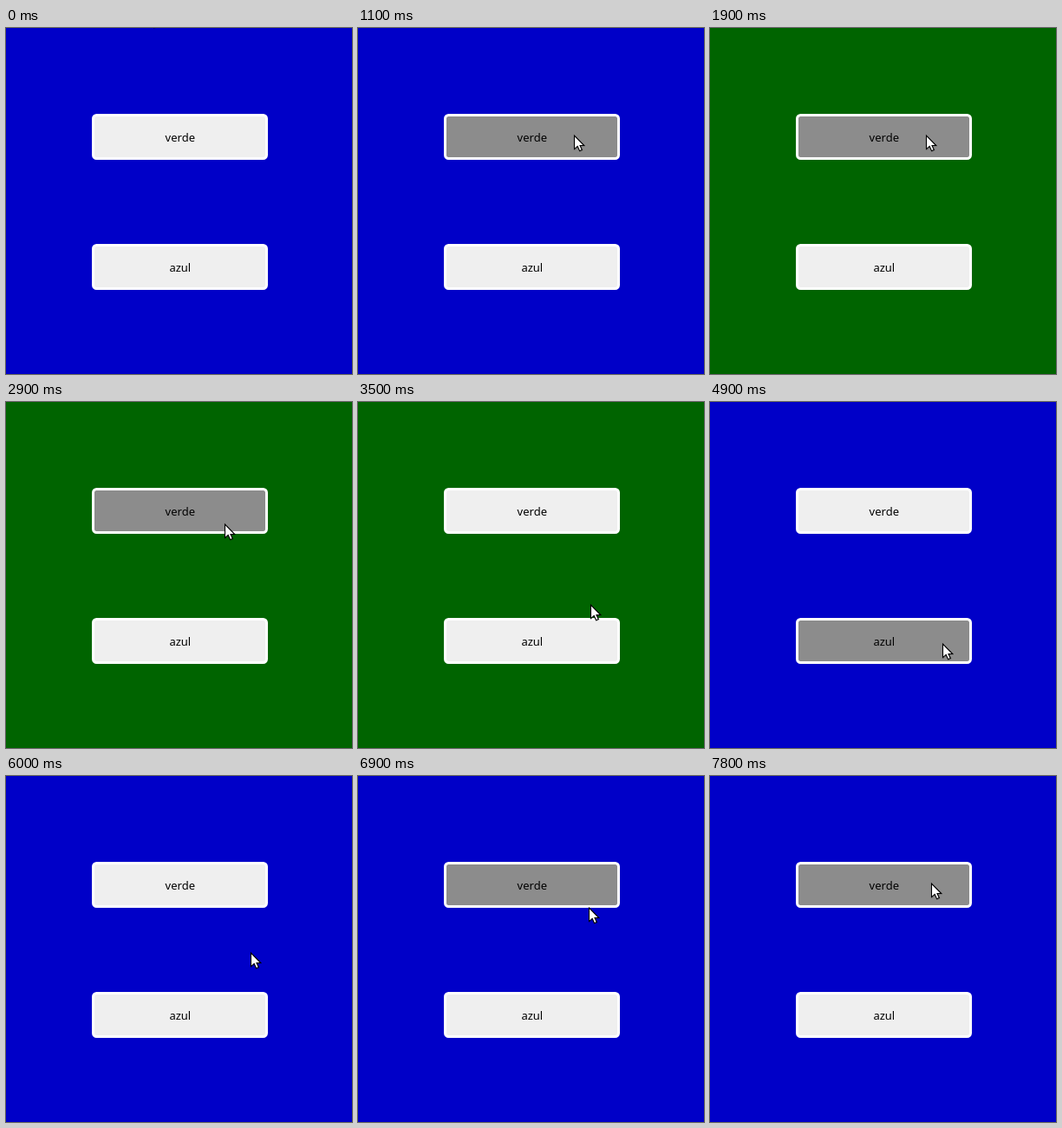
Animation of 399x399 px, one loop 8000 ms. Source, as an HTML page:

```html
<!DOCTYPE html>
<html lang="es">
<head>
<meta charset="utf-8">
<style>
  html, body { margin: 0; width: 100%; height: 100%; overflow: hidden; }
  svg { display: block; width: 100vw; height: 100vh; }
  rect { stroke: #fff; stroke-width: 3; }
  text { font: 13px "Noto Sans", "Open Sans", sans-serif; text-anchor: middle; }
</style>
</head>
<body>
<svg id="stage" viewBox="0 0 399 399">
  <g class="button">
    <rect x="100.5" y="100.5" width="200" height="50" rx="4"/>
    <text x="200.8" y="131">verde</text>
  </g>
  <g class="button">
    <rect x="100.5" y="250.5" width="200" height="50" rx="4"/>
    <text x="200.8" y="281">azul</text>
  </g>
  <g id="cursor">
    <path d="M1.3 2V17.4L5 14.2L7.4 19.4L10.2 18.2L8 13.2H12.6Z" fill="none" stroke="#000" stroke-opacity=".14"/>
    <path d="M.5 1.2V16.6L4.2 13.4L6.6 18.7L9.3 17.5L7 12.5H11.7Z" fill="#fff" stroke="#000" stroke-width="1.1"/>
  </g>
</svg>
<script>
  const LOOP = 8000, TICK = 100;
  const START = [164, -19];
  // Each move: start ms, end ms, final x, final y
  const MOVES = [
    [200, 1100, 249, 123],
    [2700, 3500, 268, 233],
    [3600, 4000, 268, 276],
    [4100, 4200, 268, 278],
    [5400, 5800, 282, 205],
    [5900, 6000, 282, 203],
    [6600, 7100, 257, 123],
    [7400, 7500, 256, 123],
    [7700, 7800, 255, 123]
  ];
  const stage = document.getElementById("stage");
  const cursor = document.getElementById("cursor");
  const boxes = [...document.querySelectorAll("rect")];

  const clamp = v => Math.min(1, Math.max(0, v));
  const ease = p => p * p * (3 - 2 * p);

  function cursorAt(t) {
    let [x, y] = START;
    for (const [from, to, endX, endY] of MOVES) {
      const p = ease(clamp((t - from) / (to - from)));
      x += (endX - x) * p;
      y += (endY - y) * p;
    }
    return [Math.round(x), Math.round(y)];
  }

  function draw(now) {
    const t = Math.floor(now % LOOP / TICK) * TICK;
    const [x, y] = cursorAt(t);
    cursor.setAttribute("transform", `translate(${x} ${y})`);
    stage.style.background = t >= 1900 && t < 4900 ? "#006400" : "#0000c8";
    boxes.forEach((box, i) => {
      const top = 99 + 150 * i;
      const hover = x >= 99 && x < 302 && y >= top && y < top + 53;
      box.setAttribute("fill", hover ? "#8c8c8c" : "#efefef");
    });
  }

  const begin = performance.now();
  function frame() {
    draw(performance.now() - begin);
    requestAnimationFrame(frame);
  }
  frame();
</script>
</body>
</html>
```
